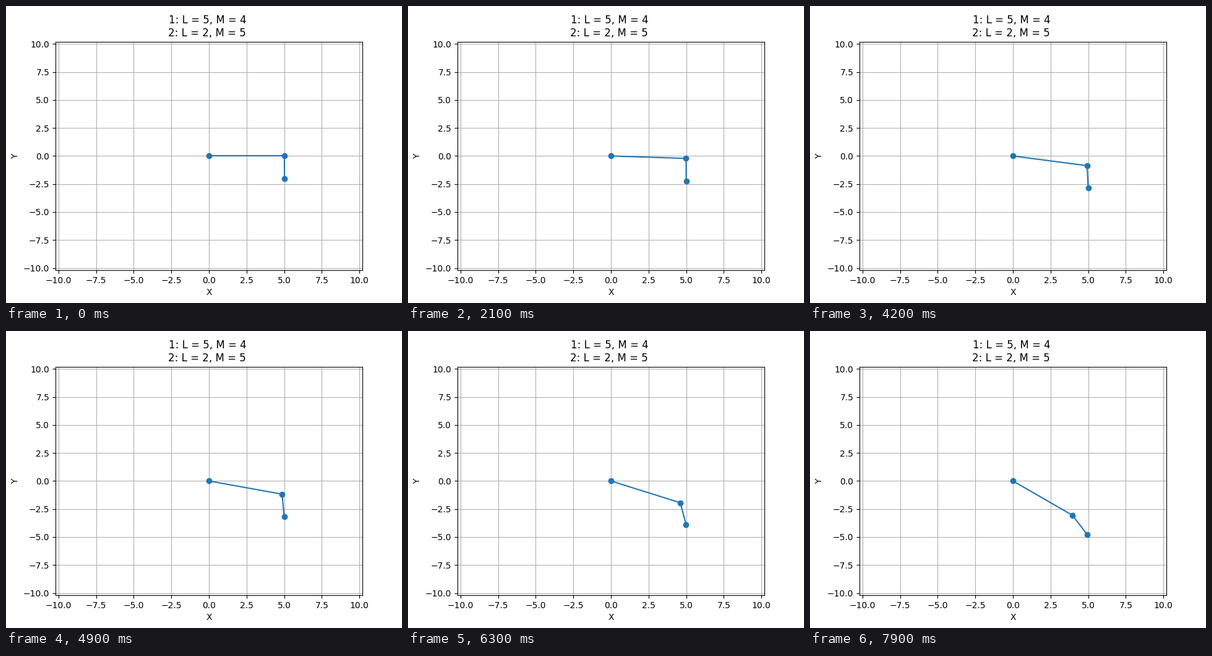
A matplotlib script that plays this animation: 640 px wide and 480 px high, repeating every 8 s.

```python
import numpy as np
import matplotlib.pyplot as plt
from matplotlib.animation import FuncAnimation

G = 9.81
L1, M1 = 5, 4
L2, M2 = 2, 5
FRAMES, INTERVAL = 80, 100
DT = 0.01


def derivs(s):
    """Equations of motion of a double pendulum, angles from the vertical."""
    a1, w1, a2, w2 = s
    d = a1 - a2
    sin, cos = np.sin(d), np.cos(d)
    den = 2 * M1 + M2 - M2 * np.cos(2 * d)
    acc1 = (-G * (2 * M1 + M2) * np.sin(a1)
            - M2 * G * np.sin(a1 - 2 * a2)
            - 2 * sin * M2 * (w2**2 * L2 + w1**2 * L1 * cos)) / (L1 * den)
    acc2 = 2 * sin * (w1**2 * L1 * (M1 + M2)
                      + G * (M1 + M2) * np.cos(a1)
                      + w2**2 * L2 * M2 * cos) / (L2 * den)
    return np.array([w1, acc1, w2, acc2])


def rk4(s, h):
    k1 = derivs(s)
    k2 = derivs(s + h / 2 * k1)
    k3 = derivs(s + h / 2 * k2)
    k4 = derivs(s + h * k3)
    return s + h / 6 * (k1 + 2 * k2 + 2 * k3 + k4)


states = [np.array([np.pi / 2, 0, 0, 0])]
for _ in range(FRAMES - 1):
    states.append(rk4(states[-1], DT))

fig, ax = plt.subplots(figsize=(6.4, 4.8), dpi=100)
ax.set_xlim(-10.2, 10.2)
ax.set_ylim(-10.2, 10.2)
ax.set_xlabel("X")
ax.set_ylabel("Y")
# The heading sits slightly left of the axes centre.
ax.set_title(f"1: L = {L1}, M = {M1}\n2: L = {L2}, M = {M2}", x=0.4947)
ax.grid(color="#b0b0b0", linewidth=0.8)
rods, = ax.plot([], [], "o-", color="tab:blue")


def draw(i):
    a1, _, a2, _ = states[i]
    x1, y1 = L1 * np.sin(a1), -L1 * np.cos(a1)
    x2, y2 = x1 + L2 * np.sin(a2), y1 - L2 * np.cos(a2)
    rods.set_data([0, x1, x2], [0, y1, y2])
    return rods,


anim = FuncAnimation(fig, draw, frames=FRAMES, interval=INTERVAL,
                     repeat=True, repeat_delay=0)
plt.show()
```
